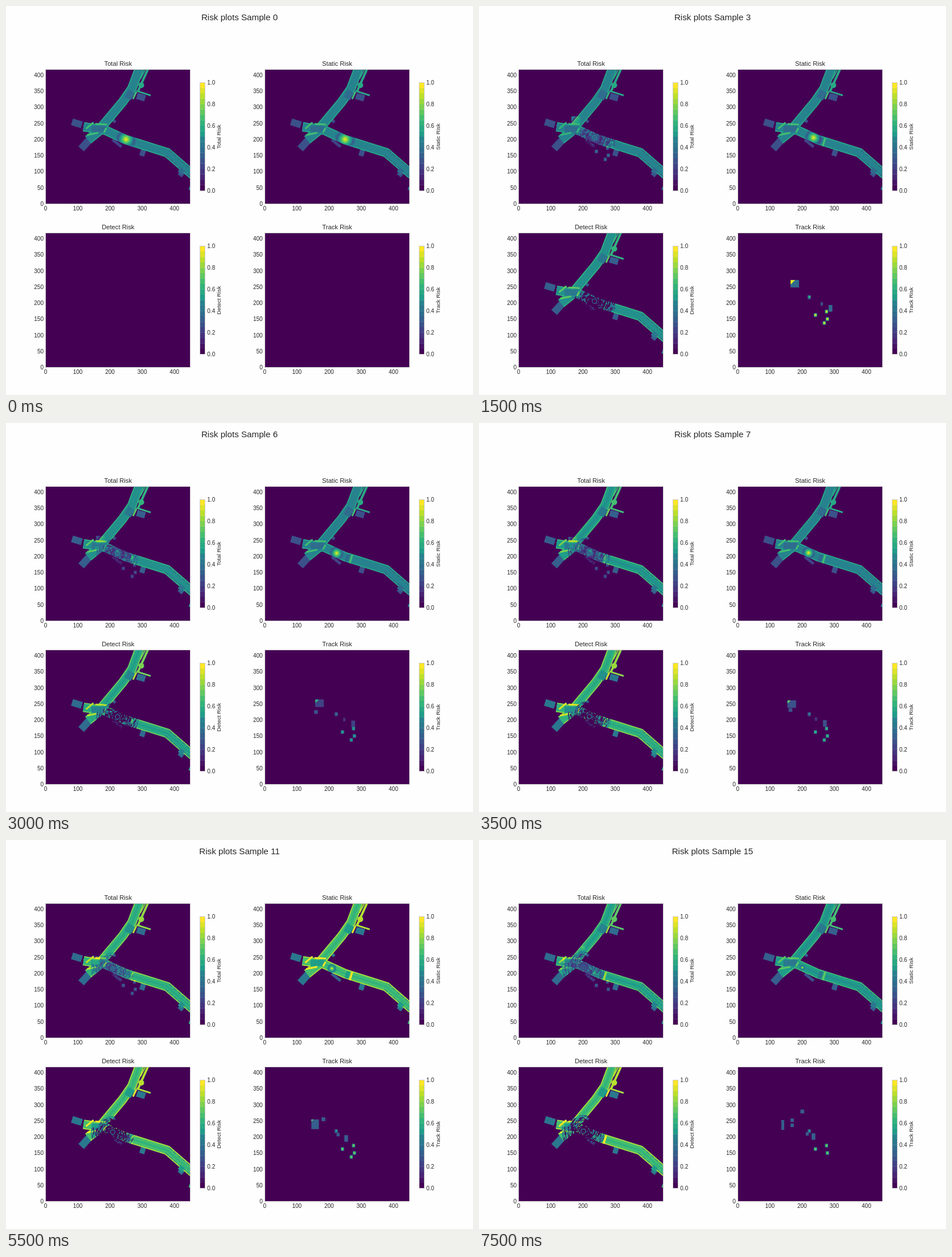
Recreate the animation shown at these times as an HTML page with a canvas. Size 820 px wide and 683 px high, loop 8000 ms.

```html
<!DOCTYPE html>
<html lang="en">
<head>
<meta charset="utf-8">
<title>Risk plots</title>
<style>
html, body { margin: 0; width: 100%; height: 100%; overflow: hidden; background: #fefefe; }
canvas, svg { position: absolute; left: 0; top: 0; }
text { font-family: "Liberation Sans", Arial, sans-serif; fill: #262626; }
</style>
</head>
<body>
<canvas id="stage" width="820" height="683"></canvas>
<svg id="labels" width="820" height="683"></svg>
<script>
const W = 450, H = 418, SCALE = 0.5655, LEFT = 69.5, TOP = 111;
const DX = 384.7, DY = 287.2, STEP = 500, COUNT = 16, LEVELS = 20;
const stage = document.getElementById('stage').getContext('2d');
const labels = document.getElementById('labels');

// Colour scale
const stops = ['440154', '482878', '3e4989', '31688e', '26828e', '1f9e89', '35b779', '6ece58', 'b5de2b', 'fde725']
  .map(c => [0, 2, 4].map(i => parseInt(c.substr(i, 2), 16)));
const palette = Array.from({ length: LEVELS + 1 }, (_, i) => {
  const p = i / LEVELS * 9, a = Math.min(8, Math.floor(p));
  return stops[a].map((c, j) => Math.round(c + (stops[a + 1][j] - c) * (p - a)));
});

// Value layers: grey stands for risk, drawn in the coordinates of the first panel
function makeLayer() {
  const c = document.createElement('canvas');
  c.width = W;
  c.height = H;
  return c.getContext('2d', { willReadFrequently: true });
}
const grey = v => { const g = Math.min(255, Math.round(v * 255)); return `rgb(${g},${g},${g})`; };
function clear(g) {
  g.setTransform(1, 0, 0, 1, 0, 0);
  g.fillStyle = '#000';
  g.fillRect(0, 0, W, H);
  g.setTransform(1 / SCALE, 0, 0, 1 / SCALE, -LEFT / SCALE, -TOP / SCALE);
}
function read(g) {
  const d = g.getImageData(0, 0, W, H).data;
  return Float32Array.from({ length: W * H }, (_, i) => d[i * 4] / 255);
}

const BOX = 0.27, DEEP = 0.36, LANE = 0.44, ROAD = 0.47, EDGE = 0.6, STRIPE = 0.68;
function drawMap() {
  const g = makeLayer();
  clear(g);
  const line = (v, width, points) => {
    g.beginPath();
    points.forEach(p => g.lineTo(...p));
    g.strokeStyle = grey(v);
    g.lineWidth = width;
    g.stroke();
  };
  const box = (v, x, y, w, h, degrees) => {
    g.save();
    g.translate(x, y);
    g.rotate(degrees * Math.PI / 180);
    g.fillStyle = grey(v);
    g.fillRect(-w / 2, -h / 2, w, h);
    g.restore();
  };
  const north = [[169, 211], [205, 168], [221, 145], [236, 105]];
  const east = [[172, 217], [210, 234.5], [283, 257.5], [328, 296.5]];
  const west = [[136, 212], [176, 218]];
  const south = [[144, 235], [173, 212]];
  const roads = [west, south, north, east];

  // side streets, then roads with their edges and lanes
  box(BOX, 124.5, 206, 18, 12, 17);
  box(BOX, 139, 243, 21, 13, -48);
  box(BOX, 237, 160, 15, 11, 16);
  box(BOX, 240.5, 256, 9, 15, 17);
  box(BOX, 309, 293, 9, 13, 40);
  box(BOX, 186, 198, 17, 5, 47);
  box(0.2, 195, 241, 20, 5, 39);
  roads.forEach(r => line(EDGE, 16.5, r));
  roads.forEach(r => line(ROAD, 13, r));
  line(LANE, 5, north);
  line(LANE, 4, east);

  // parallel strip in the north with its round end and arm
  line(EDGE, 4, [[250, 109], [232, 149]]);
  line(EDGE, 2, [[246, 109], [236, 128]]);
  line(EDGE, 3, [[229, 149], [254, 157]]);
  g.fillStyle = grey(EDGE);
  g.beginPath();
  g.arc(237.5, 139, 5, 0, 7);
  g.fill();

  // dark kerbs of the last stretch
  g.setLineDash([7, 3]);
  for (const side of [-5.5, 5.5]) {
    line(0.2, 0.8, east.slice(2).map(([x, y]) => [x - side * 0.6, y + side * 0.8]));
  }
  g.setLineDash([]);

  // crossings
  box(DEEP, 217, 156, 13, 15, 30);
  box(STRIPE, 226, 157, 3, 14, 25);
  box(DEEP, 214.5, 237, 6, 12, 17);
  box(STRIPE, 221, 239, 3.5, 15, 17);
  box(DEEP, 308, 289.5, 9, 9, 40);
  box(DEEP, 162, 216, 24, 11, 0);
  box(STRIPE, 167, 207.5, 20, 3, 3);
  box(STRIPE, 152, 224.5, 20, 3, -12);
  box(STRIPE, 147, 210, 17, 3, -40);
  box(STRIPE, 174, 218, 3, 9, 30);
  box(ROAD, 323, 320, 3, 6, 20);
  return read(g);
}
const map = drawMap();

// Strength of each layer per sample
const staticGain = s => 1 + 0.5 * Math.exp(-Math.pow((s - 12) / 2.8, 4));
const detectGain = s => s ? Math.min(1.5, 1.05 + 0.007 * s * s) : 0;
const trackGain = s => s < 2 ? 0 : 0.7 + (s < 10 ? 0.16 * Math.cos((s - 3) * Math.PI / 3) : 0);

const trackLayer = makeLayer();
function drawTrack(s) {
  const g = trackLayer, gain = trackGain(s), k = s - 3;
  clear(g);
  if (!gain) return read(g);
  g.translate(-DX, -DY);
  const rect = (v, x, y, w, h) => {
    g.fillStyle = grey(v * gain);
    g.fillRect(x, y, w, h);
  };
  // large vehicle with its bright corner
  const ax = 547 - 1.33 * k, ay = s < 9 ? 481 + 1.5 * k : 490 + (s - 9) / 3;
  const aw = 15 - 2 * Math.max(0, s - 10), corner = Math.max(0, 10 - 0.6 * s);
  rect(0.41, ax, ay, aw, s < 10 ? 13 : 17);
  g.fillStyle = grey(1.2 * gain);
  g.beginPath();
  g.moveTo(ax, ay);
  g.lineTo(ax + corner, ay);
  g.lineTo(ax, ay + corner);
  g.fill();
  // moving vehicle and walkers
  rect(0.4, 614 - 2.5 * k, 525 - 0.85 * k, 6.5, 11.5);
  if (s < 9) rect(0.27, 600 - 2.6 * k, 520 - 0.8 * k, 4, 6);
  else rect(0.42, 584 - 1.7 * (s - 9), 515 - (s - 9) / 3, 5, 6);
  rect(0.43, 577, 508, 5.5, 6.5);
  rect(0.75, 579, 509, 3, 3);
  if (s > 4) rect(0.42, 541 + 2.6 * (s - 6), 504 - 3.4 * (s - 6), 6.5, 6.5);
  if (s > 11) {
    const m = s - 13;
    rect(0.4, 552 - 2.5 * m, 484 + 2.5 * m, 6, 6);
    rect(0.4, 543 + 2 * m, 503 - 2.5 * m, 6, 6);
  }
  // parked objects
  for (const [x, y] of [[607.5, 533.5], [588, 539.5], [609, 546.5], [603.5, 553.5]]) {
    if (y > 550 && s > 13) continue;
    rect(0.7, x, y, 5.5, 6);
    rect(1.05, x + 1, y + 1, 3.5, 4);
  }
  return read(g);
}

function hash(a, b, c) {
  const n = Math.sin(a * 127.1 + b * 311.7 + c * 74.7) * 43758.5453;
  return n - Math.floor(n);
}

// Bright spot on the ego position with a darker rim
function spot(q, base) {
  if (q < 1) return 1 - 0.6 * q;
  if (q < 1.5) return base * (0.55 + 0.9 * (q - 1));
  return base;
}

// Share of the road that the scan rings leave visible
function scan(dx, dy, s) {
  const r = Math.hypot(dx, dy), reach = r * (dy < -8 ? 1.35 : 1) / 38;
  if (reach > 1) return 1;
  if (r > 3.4 && r < 4.6) return 0.6;
  const ring = Math.floor(r / 1.1), sector = Math.floor((Math.atan2(dy, dx) + 4) * (3 + r / 8));
  return hash(ring, sector, s) < Math.pow(reach, 1.2) * 0.9 ? 0.5 + 0.5 * hash(sector, ring, s + 9) : 0;
}

function fields(s) {
  const track = drawTrack(s), n = W * H, gain = staticGain(s), seen = detectGain(s);
  const total = new Float32Array(n), still = new Float32Array(n), detect = new Float32Array(n);
  const ex = 210.5 - 2.9 * s + 0.07 * s * s, ey = 223.5 + 0.36 * (ex - 182), size = 13 - 0.65 * s;
  for (let i = 0; i < n; i++) {
    const m = map[i];
    if (m) {
      const dx = i % W * SCALE + LEFT - ex, dy = Math.floor(i / W) * SCALE + TOP - ey;
      const base = Math.min(1, m * gain);
      still[i] = m > 0.3 ? spot(Math.hypot(dx, dy) / size, base) : base;
      detect[i] = seen && Math.min(1, m * seen) * scan(dx, dy, s);
    }
    total[i] = s ? 0.35 * still[i] + 0.57 * detect[i] + 0.4 * track[i] : still[i];
  }
  return [total, still, detect, track];
}

const paint = makeLayer(), image = paint.createImageData(W, H);
const origin = p => [p % 2 * DX, Math.floor(p / 2) * DY];
const crisp = v => Math.floor(v) + 0.5;
function frameBox(x, y, w, h) {
  stage.strokeStyle = '#ccc';
  stage.lineWidth = 1;
  stage.strokeRect(crisp(x), crisp(y), crisp(x + w) - crisp(x), crisp(y + h) - crisp(y));
}
function drawPanel(p, values) {
  const [x, y] = origin(p), d = image.data;
  values.forEach((v, i) => {
    d.set(palette[Math.min(LEVELS, Math.round(v * LEVELS))], i * 4);
    d[i * 4 + 3] = 255;
  });
  paint.putImageData(image, 0, 0);
  stage.drawImage(paint.canvas, LEFT + x, TOP + y, W * SCALE, H * SCALE);
  frameBox(LEFT + x, TOP + y, W * SCALE, H * SCALE);
}

function label(str, x, y, size, anchor, turn) {
  const t = document.createElementNS('http://www.w3.org/2000/svg', 'text');
  t.textContent = str;
  t.setAttribute('x', x);
  t.setAttribute('y', y);
  t.setAttribute('font-size', size);
  t.setAttribute('text-anchor', anchor);
  if (turn) t.setAttribute('transform', `rotate(-90 ${x} ${y})`);
  labels.append(t);
  return t;
}

['Total', 'Static', 'Detect', 'Track'].forEach((name, p) => {
  const [x, y] = origin(p), bottom = TOP + H * SCALE;
  label(name + ' Risk', x + 196.8, y + 104.5, 11.2, 'middle');
  label(name + ' Risk', x + 377, y + 229.5, 9.8, 'middle', true);
  for (let v = 0; v <= 400; v += 50) {
    label(v, x + 66, y + bottom - v * SCALE + 3.6, 10, 'end');
    if (v % 100 === 0) label(v, x + LEFT + v * SCALE, y + 358.8, 10, 'middle');
  }
  const barTop = y + 134, barHeight = 190, band = barHeight / LEVELS;
  for (let i = 0; i < LEVELS; i++) {
    stage.fillStyle = `rgb(${palette[Math.round(i * LEVELS / (LEVELS - 1))]})`;
    stage.fillRect(x + 340.5, barTop + barHeight - (i + 1) * band, 9.3, band + 0.3);
  }
  frameBox(x + 340.5, barTop, 9.3, barHeight);
  for (let i = 0; i <= 5; i++) label((i / 5).toFixed(1), x + 353.3, barTop + barHeight - i * 38 + 3.6, 10, 'start');
});
const title = label('', 410, 25, 15.2, 'middle');

let shown = -1;
function frame() {
  const s = Math.floor(performance.now() / STEP) % COUNT;
  if (s !== shown) {
    shown = s;
    title.textContent = 'Risk plots Sample ' + s;
    fields(s).forEach((values, p) => drawPanel(p, values));
  }
  requestAnimationFrame(frame);
}
frame();
</script>
</body>
</html>
```
